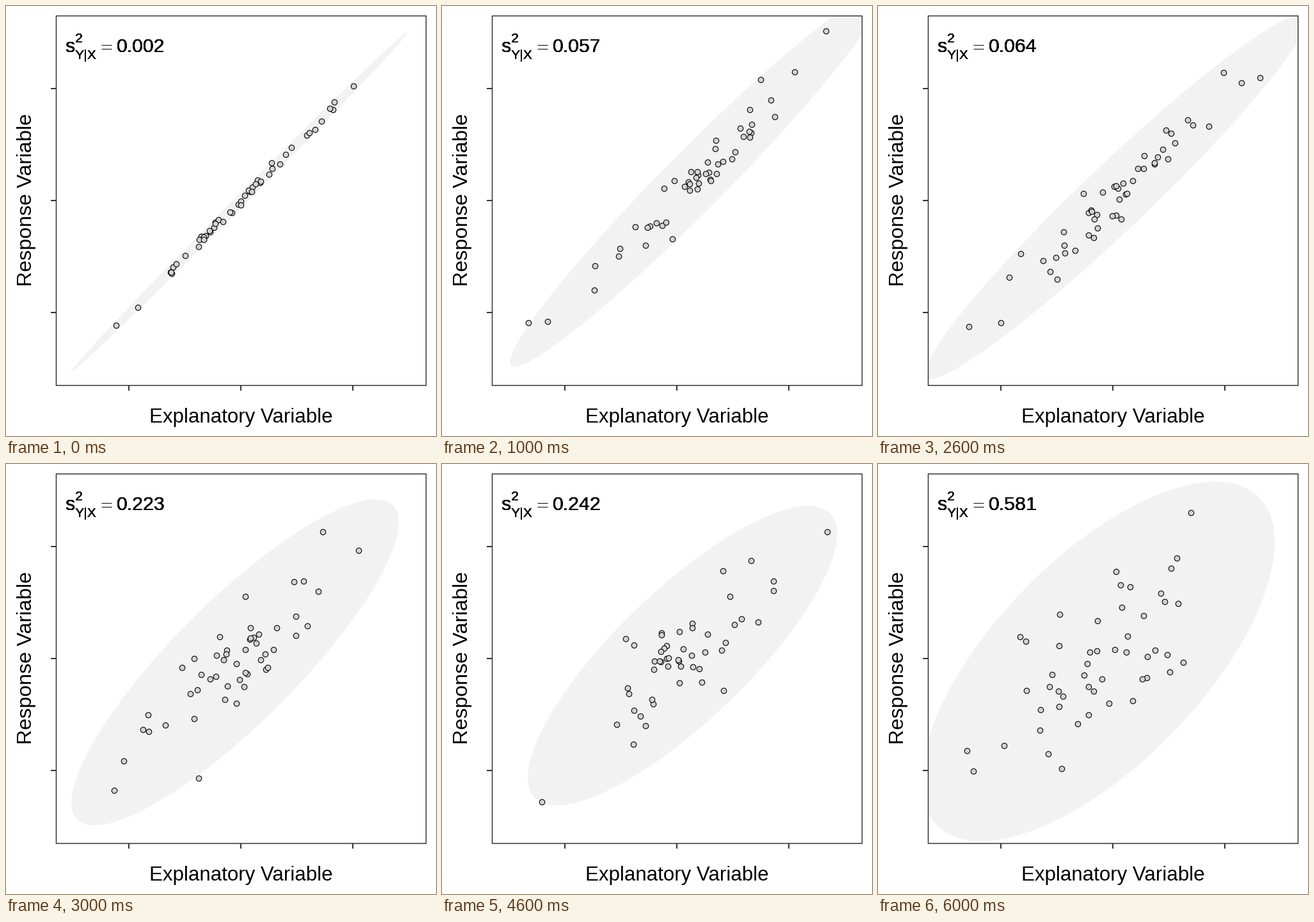
A matplotlib script that plays this animation: 672 px wide and 672 px high, repeating every 7 s.

```python
import numpy as np
import matplotlib.pyplot as plt
from matplotlib.animation import FuncAnimation
from matplotlib.patches import Polygon, Rectangle

plt.rcParams["font.family"] = ["Liberation Sans", "DejaVu Sans"]

SIZE, DPI = 672, 96
PT = 72 / DPI  # points per pixel
LEFT, TOP, RIGHT, BOTTOM = 78.5, 15.5, 656.5, 593
INK, BAND, DOT = "#333333", "#f2f2f2", "#d3d3d3"
N, UNIT, LEVEL = 50, 87.5, 0.99  # sample size, pixels per data unit, coverage

# residual variance, centre, standard deviations in pixels, two outermost points
SCENES = [
    (0.002, (364.4, 306.3), (82.8, 83.6), [(206, 471), (543, 125)]),
    (0.057, (395.9, 271.6), (91.1, 91.8), [(165, 493), (551, 103)]),
    (0.064, (371.2, 298.2), (93.8, 89.5), [(142, 501), (597, 112)]),
    (0.223, (358.0, 310.0), (80.4, 80.1), [(184, 464), (551, 135)]),
    (0.242, (375.8, 299.5), (76.0, 73.6), [(156, 528), (602, 106)]),
    (0.421, (361.5, 315.6), (91.3, 94.1), [(168, 433), (524, 101)]),
    (0.581, (344.1, 308.5), (86.8, 88.3), [(149, 480), (489, 76)]),
]


def covariance(variance, sd):
    """The residual variance fixes how much of the vertical spread is slope."""
    sx, sy = sd
    residual = variance * UNIT ** 2 * (N - 2) / (N - 1)
    sxy = -sx * np.sqrt(sy ** 2 - residual)  # pixel y runs downwards
    return np.array([[sx ** 2, sxy], [sxy, sy ** 2]])


def sample(cov, centre, ends, seed):
    """The outermost points plus a random cloud that completes the covariance."""
    dev = np.array(ends) - centre
    count = N - len(ends)
    z = np.random.default_rng(seed).normal(size=(count, 2))
    z -= z.mean(axis=0)
    white = np.linalg.solve(np.linalg.cholesky(np.cov(z.T)), z.T)
    rest = ((N - 1) * cov - dev.T @ dev) / (count - 1)
    cloud = (np.linalg.cholesky(rest) @ white).T - dev.sum(axis=0) / count
    return centre + np.vstack([dev, cloud])


def ellipse(cov, centre, segments=51):
    """Normal-theory data ellipse; the F(2, d) quantile has a closed form."""
    d = N - 1
    radius = np.sqrt(d * ((1 - LEVEL) ** (-2 / d) - 1))
    t = np.linspace(0, 2 * np.pi, segments + 1)
    circle = np.array([np.cos(t), np.sin(t)])
    return centre + radius * (np.linalg.cholesky(cov) @ circle).T


def build(seed, variance, centre, sd, ends):
    cov = covariance(variance, sd)
    centre = np.array(centre)
    return f"{variance:.3f}", ellipse(cov, centre), sample(cov, centre, ends, seed)


scenes = [build(seed, *scene) for seed, scene in enumerate(SCENES)]

fig = plt.figure(figsize=(SIZE / DPI, SIZE / DPI), dpi=DPI, facecolor="white")
ax = fig.add_axes([0, 0, 1, 1])
ax.set(xlim=(0, SIZE), ylim=(SIZE, 0))
ax.axis("off")


def label(x, y, text, size, copies=1, **kw):
    """Text on its baseline; copies darken the soft edges of the glyphs."""
    kw = {"ha": "left", "va": "baseline", "color": "black", "zorder": 5, **kw}
    return [ax.text(x, y, text, fontsize=size * PT, **kw) for _ in range(copies)]


def line(xs, ys, width, color=INK):
    ax.plot(xs, ys, color=color, lw=width * PT, solid_capstyle="butt", zorder=4)


panel = Rectangle((LEFT, TOP), RIGHT - LEFT, BOTTOM - TOP, fill=False,
                  ec=INK, lw=1.5 * PT, zorder=4, snap=False)
ax.add_patch(panel)
for k in (-1, 0, 1):
    x, y = 367 + 175 * k, 304 + 175 * k
    line([x, x], [BOTTOM, 601], 2)
    line([70, LEFT], [y, y], 2)

label(367, 651, "Explanatory Variable", 31.2, ha="center")
label(40, 303.5, "Response Variable", 32.2, ha="center", rotation=90,
      rotation_mode="anchor")

label(92.5, 72, "s", 30.35, 4)
label(107.5, 57, "2", 21.2, 4)
label(108, 83, "Y|X", 21.2, 4)
for y in (61, 67):
    line([149, 165], [y, y], 1.2, "#222222")
value = label(172.5, 72, "", 30.35, 4)

band = Polygon(scenes[0][1], closed=True, fc=BAND, ec="none", zorder=1)
ax.add_patch(band)
dots = ax.scatter(*scenes[0][2].T, s=(8.5 * PT) ** 2, c=DOT, edgecolors="black",
                  linewidths=1.1 * PT, zorder=3)
for artist in (band, dots):
    artist.set_clip_path(panel)


def draw(i):
    text, outline, points = scenes[i]
    band.set_xy(outline)
    dots.set_offsets(points)
    for t in value:
        t.set_text(text)
    return [band, dots, *value]


anim = FuncAnimation(fig, draw, frames=len(scenes), interval=1000, repeat=True)
plt.show()
```
